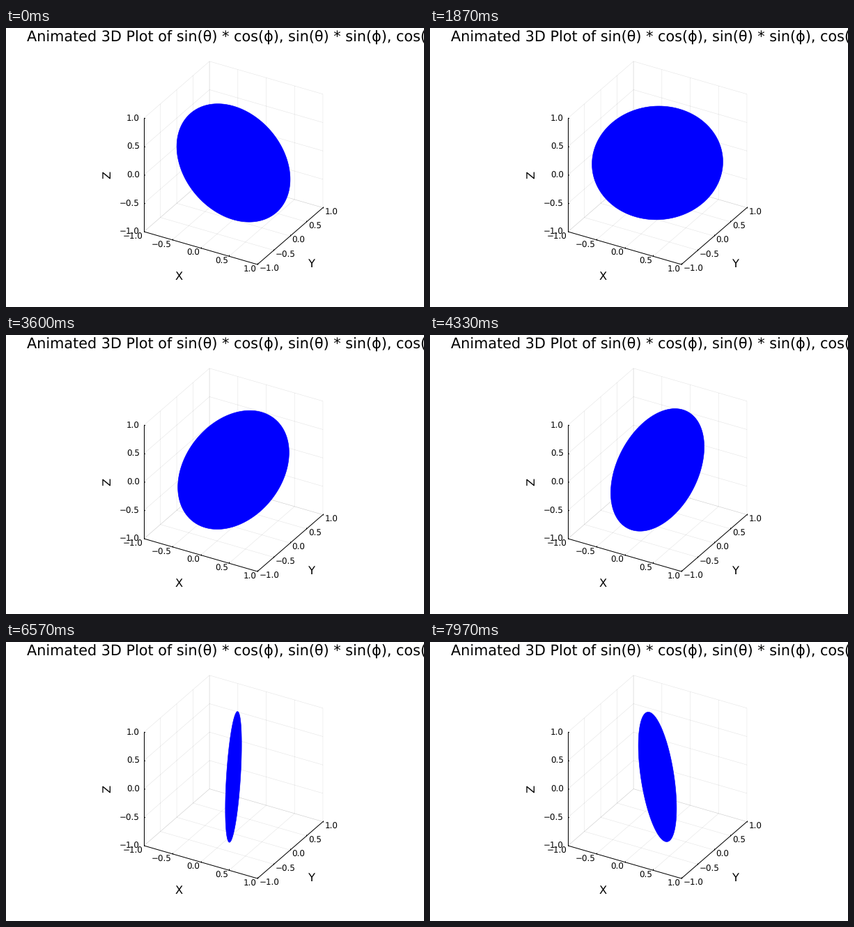
These frames come from a looping animation (600 by 400 pixels, 8 s). A matplotlib script:

```python
import numpy as np
import matplotlib.pyplot as plt
from matplotlib.animation import FuncAnimation
from matplotlib.collections import LineCollection

W, H, DPI = 600, 400, 100
PX = 72 / DPI
FRAMES, INTERVAL = 400, 20
SCALE = 94.0
CENTER = np.array([326.5, 193.4])
# Orthographic view, azimuth and elevation both 30 degrees
VIEW = SCALE * np.array([[np.sqrt(3) / 2, 0.25],
                         [0.5, -np.sqrt(3) / 4],
                         [0, -np.sqrt(3) / 2]])
TICKS = np.linspace(-1, 1, 5)

plt.rcParams["font.family"] = "DejaVu Sans"
plt.rcParams["text.hinting"] = "none"

fig = plt.figure(figsize=(W / DPI, H / DPI), dpi=DPI, facecolor="white")
ax = fig.add_axes([0, 0, 1, 1])
ax.set(xlim=(0, W), ylim=(H, 0))
ax.axis("off")


def project(points):
    return CENTER + np.asarray(points, float) @ VIEW


def lines(segments, width, **style):
    group = LineCollection([project(s) for s in segments],
                           colors="black", linewidths=width * PX, **style)
    ax.add_collection(group, autolim=False)


def text(x, y, s, size, ha="center", **kw):
    ax.text(x, y, s, fontsize=size * PX, ha=ha, va="baseline",
            color="black", **kw)


def tick_text(x, y, value, ha):
    text(x, y + 4.3, f"{value:.1f}".replace("-", "\u2212"), 11.9, ha)


def draw_grid():
    segments = []
    for t in TICKS:
        segments += [[(t, -1, -1), (t, 1, -1)], [(t, 1, -1), (t, 1, 1)],
                     [(-1, t, -1), (1, t, -1)], [(-1, t, -1), (-1, t, 1)],
                     [(-1, 1, t), (1, 1, t)], [(-1, -1, t), (-1, 1, t)]]
    lines(segments, 0.6, alpha=0.1, zorder=1, snap=False)


def draw_axes():
    nub = 0.024
    segments = [[(-1, -1, -1), (1, -1, -1)],
                [(1, -1, -1), (1, 1, -1)],
                [(-1, -1, -1), (-1, -1, 1)]]
    for t in TICKS:
        segments += [[(t, -1, -1), (t, -1, -1 + nub)],
                     [(1, t, -1), (1, t, -1 + nub)],
                     [(-1, -1, t), (-1 + nub, -1, t)]]
        x, y = project((t, -1, -1))
        tick_text(x - 1, y + 6.5, t, "right")
        x, y = project((1, t, -1))
        tick_text(x + 2.5, y + 5.7, t, "left")
        x, y = project((-1, -1, t))
        tick_text(x - 6, y, t, "right")
    lines(segments, 1, zorder=3)


draw_grid()
draw_axes()
text(248.5, 361, "X", 16.3)
text(438, 343.3, "Y", 16.3)
text(150, 210.5, "Z", 16.3, rotation=90, rotation_mode="anchor")
text(30, 18.5, "Animated 3D Plot of sin(θ) * cos(ϕ), sin(θ) * sin(ϕ), cos(θ)",
     20.75, "left")

theta = np.linspace(0, 2 * np.pi, 200)
disc, = ax.fill([0], [0], facecolor="blue", edgecolor="blue",
                lw=0.6 * PX, zorder=4)


def update(i):
    # The disc turns 0.01 rad per step, at 30 steps a second
    step = (6 * i + 4) // 10
    phi = 0.01 * step
    ring = np.column_stack([np.sin(theta) * np.cos(phi),
                            np.sin(theta) * np.sin(phi),
                            np.cos(theta)])
    disc.set_xy(project(ring))
    return disc,


anim = FuncAnimation(fig, update, frames=FRAMES, interval=INTERVAL,
                     init_func=lambda: update(0), repeat=True, repeat_delay=0)
plt.show()
```
